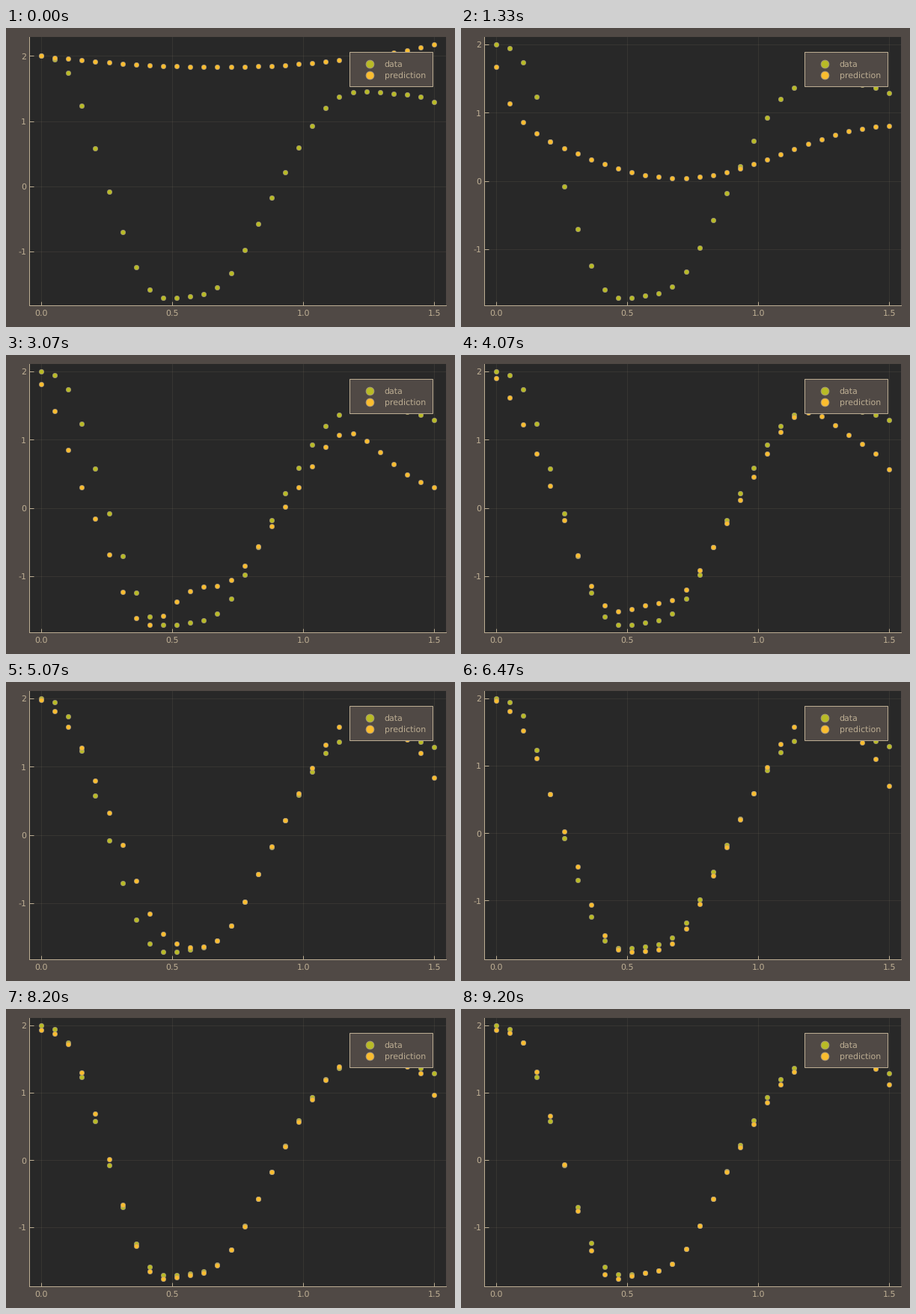
Write a matplotlib script that moves like this. It is 600 px wide and 400 px high and loops after 9390 ms.

```python
import numpy as np
import matplotlib.pyplot as plt
from matplotlib.animation import FuncAnimation
from matplotlib.patches import Rectangle
from matplotlib.lines import Line2D
from matplotlib.ticker import FuncFormatter, MultipleLocator
from matplotlib.transforms import Affine2D

W, H = 600, 400
LOOP_MS, FRAMES = 9390, 141
PX = 0.72  # points per pixel at 100 dpi

PAPER, PANEL, INK = "#504945", "#282828", "#bdae93"
GREEN, AMBER, RING = "#b8bb26", "#fabd2f", "#a89984"

N = 30
T_END = 1.5
index = np.arange(N)
t = np.linspace(0, T_END, N)

plt.rcParams["font.family"] = "DejaVu Sans"
plt.rcParams["font.size"] = 11 * PX
plt.rcParams["text.hinting"] = "none"


def spiral(u):
    a, b = u**3
    return np.array([-0.1 * a - 2 * b, 2 * a - 0.1 * b])


def solve_data(substeps=40):
    """First component of the cubic spiral, by Runge-Kutta."""
    u = np.array([2.0, 0.0])
    dt = T_END / (N - 1) / substeps
    out = [u[0]]
    for _ in range(N - 1):
        for _ in range(substeps):
            k1 = spiral(u)
            k2 = spiral(u + dt / 2 * k1)
            k3 = spiral(u + dt / 2 * k2)
            k4 = spiral(u + dt * k3)
            u = u + dt / 6 * (k1 + 2 * k2 + 2 * k3 + k4)
        out.append(u[0])
    return np.array(out)


data = solve_data()


def off_by(*bumps):
    """The data plus Gaussian errors, each (centre, width, height)."""
    return data + sum(h * np.exp(-((index - c) / w)**2 / 2) for c, w, h in bumps)


def mix(a, b, w):
    return a + (b - a) * w


flat = 2 - 0.468 * t + 0.264 * t**2 + 0.084 * t**3
sagging = 0.428 - 0.385 * np.cos(3.8 * (t - 0.698)) + 0.9 * np.exp(-15.2 * t)
early = off_by((2.4, 1.35, -0.88), (5.8, 1.7, -0.52), (11.7, 2.1, 0.5),
               (19.5, 1.8, -0.27), (28.5, 3.6, -1))
late = off_by((1.7, 0.8, -0.2), (6.6, 1.9, 0.58), (23.3, 1.8, 0.28), (31, 1.6, -1))
deep = off_by((2, 1, -0.22), (6.4, 1.2, 0.22), (13, 3, -0.09),
              (23.3, 1.8, 0.27), (31, 1.8, -1.1))
close = off_by((1, 1.2, -0.09), (4.9, 1.4, 0.18), (10.5, 2, -0.06),
               (23, 1.8, 0.13), (31, 1.5, -1.15))
fitted = off_by((0.5, 1, -0.07), (3.6, 1, 0.09), (7.5, 1.3, -0.12),
                (20.5, 1.7, -0.085), (30.5, 0.9, -0.7))
almost = mix(close, fitted, 0.8)

# Training progress: (frame, prediction), linear in between
STAGES = [
    (1, flat), (19, sagging), (30, mix(sagging, early, 0.62)),
    (40, mix(sagging, early, 1.11)), (46, early), (76, late), (97, deep),
    (112, close), (129, almost), (134, almost), (138, fitted),
]
stage_at, stage_y = zip(*STAGES)


def prediction(frame):
    pos = np.interp(frame, stage_at, range(len(STAGES)))
    i = min(int(pos), len(STAGES) - 2)
    return mix(stage_y[i], stage_y[i + 1], pos - i)


def padded(lo, hi):
    pad = 0.03 * (hi - lo)
    return lo - pad, hi + pad


fig = plt.figure(figsize=(W / 100, H / 100), dpi=100, facecolor=PAPER)
left, right, top, bottom = 31.2, 588, 12, 371
ax = fig.add_axes([left / W, 1 - bottom / H, (right - left) / W, (bottom - top) / H],
                  facecolor=PANEL)
ax.set_xlim(*padded(0, T_END))
ax.set_xticks([0, 0.5, 1, 1.5], ["0.0", "0.5", "1.0", "1.5"])
ax.yaxis.set_major_locator(MultipleLocator(1))
ax.yaxis.set_major_formatter(FuncFormatter(lambda v, _: str(round(v))))
ax.tick_params(direction="in", length=5.5 * PX, width=PX, color=INK, labelcolor=INK)
ax.tick_params(axis="x", pad=5.3 * PX)
ax.tick_params(axis="y", pad=4.2 * PX)
ax.grid(color=INK, alpha=0.1, linewidth=PX)
ax.set_axisbelow(True)
for side, spine in ax.spines.items():
    spine.set_visible(side in ("left", "bottom"))
    spine.set_color(INK)
    spine.set_linewidth(PX)


def dots(y, color):
    return ax.plot(t, y, "o", color=color, ms=6.4 * PX, mec=RING,
                   mew=0.6 * PX, clip_on=False)[0]


dots(data, GREEN)
guess = dots(flat, AMBER)

# Legend, placed in pixels from the top left corner
pixels = Affine2D().scale(1 / W, -1 / H).translate(0, 1) + fig.transFigure
fig.add_artist(Rectangle((459, 32), 111, 46, facecolor=PAPER, edgecolor=INK,
                         linewidth=PX, transform=pixels, zorder=5))
for label, color, y in (("data", GREEN, 47.5), ("prediction", AMBER, 63)):
    fig.add_artist(Line2D([486], [y], marker="o", color=color, ms=10.8 * PX, mec=RING,
                          mew=0.8 * PX, transform=pixels, zorder=6))
    fig.text(505.7, y + 4.2, label, color=INK, transform=pixels, zorder=6)


def update(frame):
    y = prediction(frame)
    guess.set_ydata(y)
    ax.set_ylim(*padded(min(data.min(), y.min()), max(data.max(), y.max())))
    return [guess]


anim = FuncAnimation(fig, update, frames=FRAMES, interval=LOOP_MS / FRAMES,
                     repeat=True, repeat_delay=0, blit=False)
plt.show()
```
